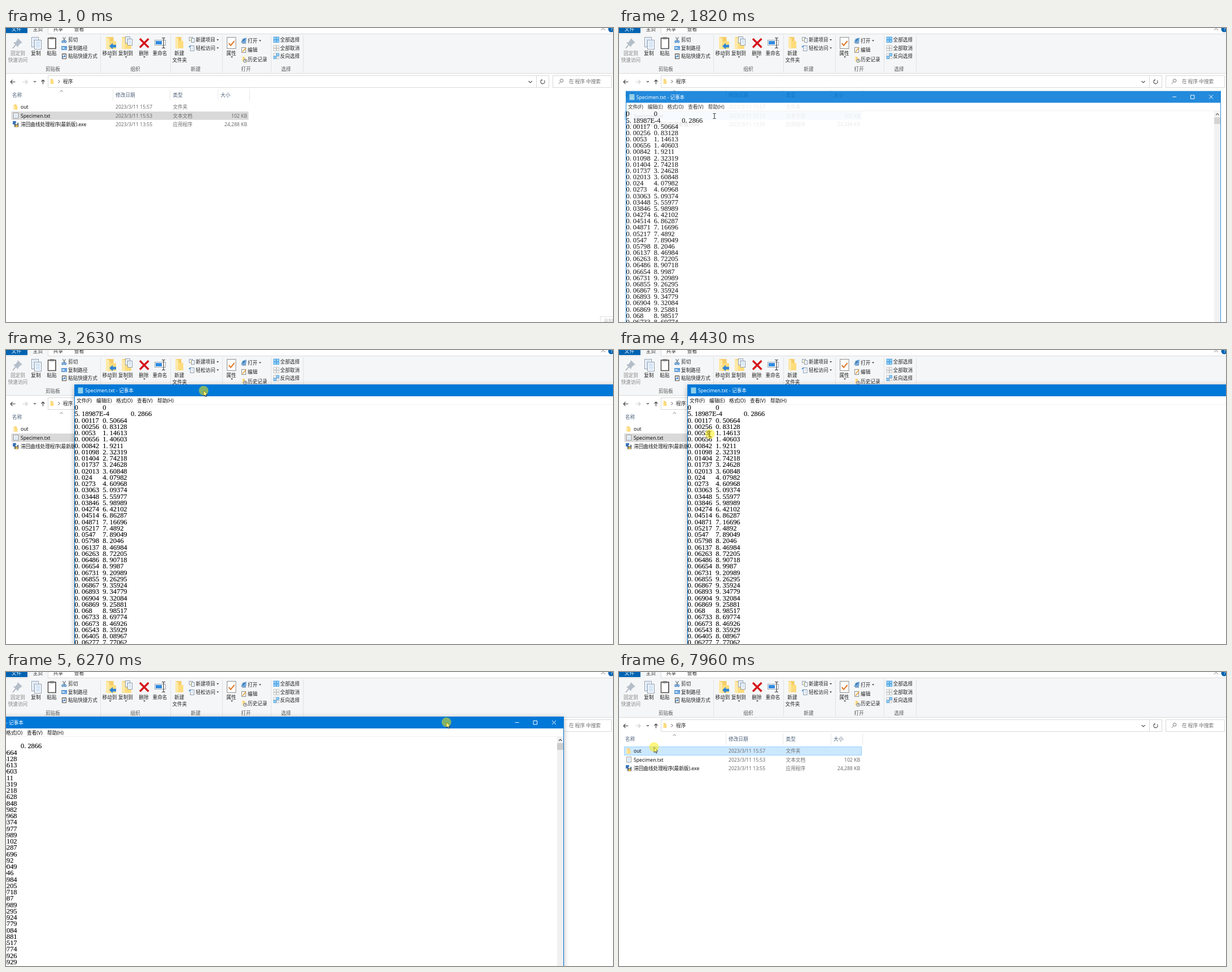
An HTML page that plays this animation: 1075 px wide and 521 px high, repeating every 8 s.

```html
<!DOCTYPE html>
<html lang="zh-CN">
<head>
<meta charset="utf-8">
<style>
html, body { margin: 0; width: 100%; height: 100%; overflow: hidden; background: #fff }
svg { display: block; width: 1075px; height: 521px }
text { font-family: "Noto Sans", "Noto Sans CJK SC", "Noto Sans CJK", sans-serif; font-size: 8.65px; fill: #222 }
.data text { font-family: "Liberation Serif", serif; font-size: 12.4px; fill: #000; stroke: #000; stroke-width: .12 }
.raised { filter: drop-shadow(0 2px 5px rgba(0,0,0,.3)) }
</style>
</head>
<body>
<svg id="stage" viewBox="0 0 1075 521"></svg>
<script>
const STEP = 100.6, LOOP = 8000, W = 1062, H = 702, ROW = 11.25;
const $ = id => document.getElementById(id);

// Drawing helpers return SVG markup
const rect = (x, y, w, h, fill, more = '') => `<rect x="${x}" y="${y}" width="${w}" height="${h}" fill="${fill}" ${more}/>`;
const box = (x, y, w, h, fill, line) => rect(x, y, w, h, fill, `stroke="${line}"`);
const path = (d, line, w = 1, fill = 'none') => `<path d="${d}" stroke="${line}" stroke-width="${w}" fill="${fill}"/>`;
const fill = (d, color) => path(d, 'none', 0, color);
const text = (x, cy, s, color = '#222', anchor = 'start', more = '') =>
  `<text x="${x}" y="${cy + 3.2}" style="fill:${color}" text-anchor="${anchor}" ${more}>${s}</text>`;
const label = (x, cy, s, color) => text(x, cy, s, color, 'middle');
const drop = (x, y) => fill(`M${x - 2} ${y - 1}h4l-2 2.3z`, '#333');
const page = (x, y, w, h, line = '#8a9bb0') => {
  let s = box(x + .5, y + .5, w, h, '#fff', line);
  for (let i = 3; i < h - 1; i += 2.5) s += path(`M${x + 2.5} ${y + i}h${w - 4}`, '#86b4e4', .8);
  return s;
};
const folder = (x, y, w, h) => rect(x, y, w * .75, h, '#f5cd66') +
  fill(`M${x} ${y}L${x + w * .35} ${y + h * .12}V${y + h * 1.05}L${x} ${y + h}z`, '#ffe9a8') +
  rect(x + w * .35, y + h * .35, w * .65, h * .65, '#ffdc7c');
const clipboard = (x, y, w, h) => box(x, y, w, h, '#fff', '#4d4a48') +
  path(`M${x} ${y}h${w}v${h}h${-w}z`, '#55504d', w / 9) + rect(x + w * .25, y - h * .1, w * .5, h * .2, '#7b7b7b');

function ribbon() {
  let s = rect(0, 11, 1075, 69, '#f5f6f7') + path('M0 10.5H38M74 10.5H1075M74.5 0V10M0 80.5H1075', '#dadbdc') +
    rect(38, 0, 36, 12, '#f5f6f7') + rect(0, 0, 38, 9, '#0063b1') + label(18.5, 2, '文件', '#fff');
  [[56.5, '主页'], [92.5, '共享'], [129.5, '查看']].forEach(([x, t]) => s += label(x, 2, t));
  s += path('M1054 4l3.5-3.5L1061 4', '#777') + '<circle cx="1072" cy="2" r="5.5" fill="#0063b1"/>' + label(1072.5, 2, '?', '#fff');
  [167, 291, 383, 469, 526].forEach(x => s += path(`M${x}.5 13V79`, '#e1e2e3'));
  [[83, '剪贴板'], [229, '组织'], [336, '新建'], [425, '打开'], [496, '选择']].forEach(([x, t]) => s += label(x, 73, t, '#555'));
  [[53, '复制'], [81, '粘贴'], [183.5, '移动到'], [212, '复制到'], [244, '删除'], [272.5, '重命名'], [307, '新建'], [399, '属性']]
    .forEach(([x, t]) => s += label(x, 45, t));
  s += label(21, 45, '固定到', '#858585') + label(21, 56.5, '快速访问', '#858585') + label(307.5, 56.5, '文件夹');
  [[110, 21, '剪切'], [110, 35.5, '复制路径'], [110, 50, '粘贴快捷方式'], [336, 21, '新建项目'], [336, 35.5, '轻松访问'],
   [428, 22.5, '打开'], [428, 39, '编辑'], [428, 55.5, '历史记录'], [485.5, 21, '全部选择'], [485.5, 35.5, '全部取消'], [485.5, 50, '反向选择']]
    .forEach(([x, y, t]) => s += text(x, y, t));
  [[184.5, 51.5], [212.5, 51.5], [245, 51.5], [400, 51.5], [375, 21], [375, 35.5], [450, 22.5]].forEach(([x, y]) => s += drop(x, y));
  return s + icons();
}

function icons() {
  let s = fill('M21 18L29 26 26 27 22 31 21 34 13 26 17 25 20 21z', '#b4bec9') + path('M17 30L12 36', '#9aa5b1', 1.3);
  s += page(45, 16, 12, 17) + page(50, 21, 12, 16);
  s += clipboard(74.5, 18, 13.5, 18.5);
  s += path('M100.5 16L104.5 23M105.5 16L101.5 23', '#6c7883', 1.2) +
    '<g fill="none" stroke="#2b78c5" stroke-width="1.2"><circle cx="100.5" cy="24.3" r="1.6"/><circle cx="105" cy="24.3" r="1.6"/></g>';
  s += rect(98, 32, 10, 7, '#5b9bd8') + path('M99.5 34l1 3 1-3 1 3 1-3M104.5 37h2', '#fff', .9);
  s += clipboard(99.5, 46, 7, 8.5) + path('M101 53v-3h3.5m-1.5-1.5l1.7 1.5-1.7 1.5', '#2470c0', 1.1);
  s += folder(177, 16, 18, 21) + fill('M183 32l6-5.5v3.3h6v4.6h-6v3.3z', '#2f86d6');
  s += folder(205, 16, 17, 21) + page(211, 15, 8, 11) + page(215, 19, 8, 11);
  s += path('M237 19L252.5 34.5M252.5 19L237 34.5', '#d5161c', 3.4);
  s += box(263.5, 21.5, 19, 9, '#fff', '#9aa4ad') + rect(265, 23, 11, 6, '#2f8ae0') +
    path('M276 17.5h2l1 1 1-1h2M276 35.5h2l1-1 1 1h2M279 18.5V34.5', '#444', 1.2);
  s += folder(300.5, 16, 13.5, 20);
  s += box(324.5, 16.5, 6, 6, '#fff', '#8a9bb0') + rect(327, 18, 4, 6, '#ffdc7c') + page(328, 18, 5, 7);
  s += page(326, 31, 6.5, 9) + path('M324 34l3-3', '#2f86d6', 1.6);
  s += box(391.5, 16.5, 15.5, 20, '#fff', '#8d8d8d') + path('M394.5 27l3.5 4 6.5-8', '#e07a2c', 2);
  s += fill('M416 26l3-7 7-2-1 9z', '#6ea6d8') + path('M419 23l4-3.5M418 27h7', '#285f96', 1.2);
  s += box(417.5, 34.5, 7, 9, '#fff', '#8a8a8a') + path('M419 42l6-7', '#e0a030', 1.6);
  s += folder(418, 51, 6, 8) + '<circle cx="423.5" cy="58" r="3" fill="#eee" stroke="#666" stroke-width=".9"/>' + path('M423.5 56v2h1.5', '#444', .8);
  [[16, 1, 1], [31, 0, 0], [45, 0, 1]].forEach(([y, a, b]) => {
    for (let i = 0; i < 4; i++) {
      const on = (i === 0 || i === 3) ? a : b;
      s += rect(474 + i % 2 * 5.2, y + (i >> 1) * 5.2, 4.3, 4.3, on ? '#9bd2fa' : '#fafafa', `stroke="${on ? '#2f94dc' : '#b5b5b5'}" stroke-width=".8"`);
    }
  });
  return s;
}

function addressBar() {
  return path('M16.5 95.5H8m3.5-3.5L8 95.5l3.5 3.5', '#444', 1.1) + path('M29.5 95.5H38m-3.5-3.5l3.5 3.5-3.5 3.5', '#ccc', 1.1) +
    path('M49 94l2 2 2-2', '#555', 1.1) + path('M65.5 99.5V92m-3 3l3-3 3 3', '#444', 1.2) +
    box(74.5, 84.5, 887, 21, '#fff', '#d9d9d9') + path('M939.5 84V106', '#d9d9d9') + folder(78, 90.5, 6.5, 8.5) +
    path('M92.5 92l2.5 2.8-2.5 2.8', '#555') + text(101, 95, '程序') +
    path('M925.5 94l3 3 3-3', '#555', 1.2) + path('M952.8 92.6a3.6 3.6 0 1 1-4.2-.4M949 90.5v2.5h-2.5', '#555', 1.1) +
    box(968.5, 84.5, 104, 21, '#fff', '#d9d9d9') +
    '<circle cx="984" cy="93.3" r="2.8" fill="none" stroke="#777"/>' + path('M982 95.5l-3.5 3.5', '#777') +
    text(997, 95, '在 程序 中搜索', '#6d6d6d');
}

function fileList() {
  const files = [['out', '15:57', '文件夹', ''], ['Specimen.txt', '15:53', '文本文档', '102 KB'], ['滞回曲线处理程序(最新版).exe', '13:55', '应用程序', '24,288 KB']];
  let s = path('M95.5 113l2.7-2.5 2.7 2.5', '#777');
  [[11, '名称'], [194, '修改日期'], [295.5, '类型'], [380, '大小']].forEach(([x, t]) => s += text(x, 119, t, '#4c607a'));
  [190, 291, 376, 432].forEach(x => s += path(`M${x - .5} 109V129`, '#e8e8e8'));
  files.forEach(([name, time, type, size], i) => {
    const y = 140 + 15.4 * i;
    s += rect(9.5, y - 7.4, 420, 14.8, 'none', `id="row${i}"`) + text(26, y, name, '#111') +
      text(194, y, '2023/3/11 ' + time, '#6d6d6d') + text(295.5, y, type, '#6d6d6d') + text(427, y, size, '#6d6d6d', 'end');
  });
  return s + folder(13.5, 135.5, 7, 9) + page(13, 150, 8, 9.5, '#999') +
    rect(12, 165, 6, 6, '#3a78c2') + rect(15, 168, 7, 7.5, '#37485c') + rect(16.5, 168, 4, 3, '#d8e6f4') + rect(16.5, 172, 4.5, 3.5, '#f0c24c');
}

const samples = `0 0|5.18987E-4 0.2866|0.00117 0.50664|0.00256 0.83128|0.0053 1.14613|0.00656 1.40603|0.00842 1.9211|0.01098 2.32319|
0.01404 2.74218|0.01737 3.24628|0.02013 3.60848|0.024 4.07982|0.0273 4.60968|0.03063 5.09374|0.03448 5.55977|0.03846 5.98989|
0.04274 6.42102|0.04514 6.86287|0.04871 7.16696|0.05217 7.4892|0.0547 7.89049|0.05798 8.2046|0.06137 8.46984|0.06263 8.72205|
0.06486 8.90718|0.06654 8.9987|0.06731 9.20989|0.06855 9.26295|0.06867 9.35924|0.06893 9.34779|0.06904 9.32084|0.06869 9.25881|
0.068 8.98517|0.06733 8.69774|0.06673 8.46926|0.06543 8.35929|0.06405 8.08967|0.06277 7.77062`.split('|');

function notepad() {
  let s = rect(0, 0, W, H, '#fff') + rect(0, 0, W, 21, '#0078d7') + path(`M.5 0V${H}M${W - .5} 0V${H}`, '#0078d7') +
    rect(6.5, 5.5, 9, 10.5, '#8fd0ea') + text(19, 10.8, 'Specimen.txt - 记事本', '#fff') +
    path(`M1 35.5H${W - 1}`, '#f0f0f0') + rect(W - 12, 35, 11, H - 36, '#f0f0f0') + rect(W - 12, 47, 11, 12, '#cdcdcd') +
    path(`M${W - 9} 43l2.7-2.7 2.7 2.7`, '#444', 1.2) +
    `<g id="buttons">${path('M975.5 10.5h7M1008 7.5h6.5v6.5h-6.5zM1041 7l7 7M1048 7l-7 7', '#fff')}</g>`;
  ['文件(F)', '编辑(E)', '格式(O)', '查看(V)', '帮助(H)'].forEach((t, i) => s += text([4, 39, 74, 111, 147][i], 28.5, t, '#111'));
  s += '<g class="data">';
  samples.forEach((line, i) => line.trim().split(' ').forEach((v, col) => {
    const x = .6 + col * (i === 1 ? 99.4 : 49.6);
    s += `<text x="${x}" y="${45.2 + ROW * i}">${v.replace('.', '. ')}</text>`;
  }));
  return s + '</g>' + rect(0, 0, 1, 11, '#000', 'id="caret"');
}

$('stage').innerHTML = rect(0, 0, 1075, 521, '#fff') + ribbon() + addressBar() + fileList() +
  `<g id="recorder">${box(1052.5, 511.5, 40, 20, '#fff', '#dedede')}${text(1058, 520, '录制', '#bbb')}</g>` +
  `<g id="win">${notepad()}</g>
  <g id="pointer">
    <g id="arrow">${path('M0 0V9.6L2.2 7.6 3.8 11 5.3 10.4 3.8 7H6.8Z', '#111', .8, '#fff')}</g>
    <g id="beam">${path('M-2.5 -4.5h2l.5.5.5-.5h2M-2.5 4.5h2l.5-.5.5.5h2M0 -4V4', '#111', .9)}</g>
    <circle id="halo" r="8.5" fill="#ffee00" fill-opacity=".5"/>
  </g>`;

// Pointer stops: step, x, y
const stops = [[1, 1062, 514], [9, 171, 156], [18, 169, 156], [20, 169, 156], [23, 237, 120], [24, 237, 120], [26, 350, 72], [27, 350, 72],
  [29, 180, 142], [30, 180, 142], [37, 154, 149], [43, 154, 149], [44, 161, 149], [46, 168, 149], [48, 168, 149], [53, 202, 149], [55, 202, 149],
  [56, 459, 104], [59, 975, 71], [60, 975, 71], [62, 780, 89], [64, 776, 90], [68, 948, 89], [71, 948, 89], [78, 62, 133], [80, 62, 133]];
const carets = [[17, .5, 0], [39, 38, 4], [55, 81.5, 4]]; // step, x, line
const quiet = [16, 17, 18, 40, 69, 70, 71];               // halo hidden after a click

function pointerAt(n) {
  const i = Math.max(1, stops.findIndex(s => s[0] >= n));
  const [a, ax, ay] = stops[i - 1], [b, bx, by] = stops[i];
  const p = Math.max(0, (n - a) / (b - a));
  return [ax + (bx - ax) * p, ay + (by - ay) * p];
}

// The window follows the pointer during its two drags
function windowAt(n) {
  if (n < 60) {
    const [x, y] = pointerAt(Math.min(26, Math.max(24, n)));
    return [x - 229, y - 11];
  }
  const [x, y] = pointerAt(Math.min(64, n));
  return [x - 854, y - 10];
}

const show = (id, on) => $(id).setAttribute('visibility', on ? 'inherit' : 'hidden');
const opacities = { 17: .3, 18: .86, 70: .95, 71: .4 }, scales = { 17: .98, 18: .9925, 71: .97 };

function paintRow(i, color, hover) {
  $('row' + i).setAttribute('fill', color);
  $('row' + i).setAttribute('stroke', color === '#cce8ff' ? (hover ? '#99d1ff' : color) : 'none');
}

function draw() {
  const n = Math.floor(performance.now() % LOOP / STEP);
  const [x, y] = pointerAt(n), [wx, wy] = windowAt(n);
  const open = n >= 17 && n < 72, hovered = !open && x < 430 ? Math.floor((y - 132) / 15.4) : -1;

  show('recorder', n < 2);
  show('win', open);
  const k = scales[n] || 1;
  $('win').setAttribute('transform', `translate(${wx + W / 2 * (1 - k)} ${wy + H / 2 * (1 - k)}) scale(${k})`);
  $('win').setAttribute('opacity', opacities[n] || 1);
  $('win').classList.toggle('raised', k === 1);
  show('buttons', n < 70);

  const [start, cx, line] = carets.filter(c => c[0] <= n).pop() || carets[0];
  $('caret').setAttribute('x', cx);
  $('caret').setAttribute('y', 36 + ROW * line);
  show('caret', (n - start) % 10.52 < 5.26);

  const active = n >= 8 && n < 19 || n >= 72;
  paintRow(0, n >= 79 ? '#cce8ff' : hovered === 0 ? '#e5f3ff' : 'none', true);
  paintRow(1, n >= 79 ? 'none' : active ? '#cce8ff' : '#d9d9d9', hovered === 1);
  paintRow(2, hovered === 2 ? '#e5f3ff' : 'none', true);

  const typing = open && n >= 18 && y > wy + 36;
  show('pointer', n > 0);
  $('pointer').setAttribute('transform', `translate(${x} ${y})`);
  show('beam', typing);
  show('arrow', !typing);
  show('halo', !quiet.includes(n));
  requestAnimationFrame(draw);
}
draw();
</script>
</body>
</html>
```
